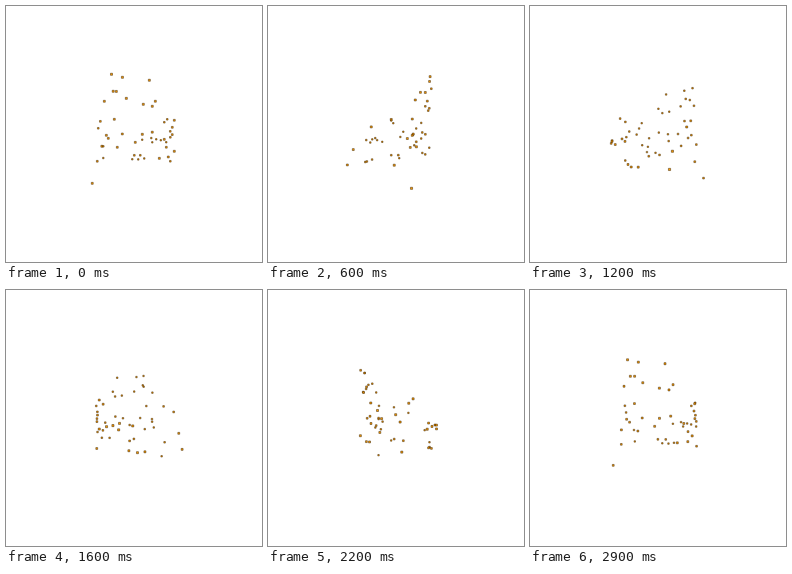
An HTML page with a canvas for the animation above (3000 ms loop, 256 by 256 pixels).

```html
<!DOCTYPE html>
<html>
<head>
<meta charset="utf-8">
<style>
  html, body { margin: 0; height: 100%; overflow: hidden; background: #fff; }
  canvas { display: block; }
</style>
</head>
<body>
<canvas id="stage" width="256" height="256"></canvas>
<script>
const ctx = document.getElementById('stage').getContext('2d');
const LOOP = 3000, STEPS = 30;
const CENTER = 128.3;
const EYE = 128 / Math.tan(Math.PI / 6); // 60 degree field of view

// Cloud of points: x, depth towards the viewer, y (down)
const cloud = [
  [-19, 37, -50], [-10, 35, -48], [12.8, 33, -46], [-18, 32.6, -36.7], [-15.7, 27.8, -37.5],
  [-6.8, 32.4, -30.7], [-26.5, 25.6, -29.2], [7.7, 31.8, -25.7], [18.6, 25.8, -29.2], [15.6, 29.4, -24.3],
  [-33, 6.2, -12.6], [-37.7, -10.2, -6.3], [-18.1, 20.9, -13.6], [31.9, -14, -12.8], [35.6, -17.8, -16.2],
  [36.8, 17.8, -12.9], [35.9, 12.2, -6.6], [36.5, -3.3, -3], [36.5, 8.6, 0.3], [37.2, -7.1, 3.1],
  [-25.1, 22.6, 0.9], [-23.9, 17.9, 3.7], [-10.9, 20, -0.3], [7, 28, 0], [9.3, -37.5, 6.3],
  [0.9, 20.2, 7.3], [16.1, 23.1, -1.9], [19.4, -31.2, 4.3], [21.1, -38.1, 9.4], [25.7, -37.7, 5.9],
  [30.5, -33.6, 6.9], [27.3, 19.7, 4.6], [36.2, -29.4, 9], [30.4, 11.2, 12.3], [-28.5, 27, 10.5],
  [-35, -28.9, 13.6], [-15.6, 18.4, 11.9], [35.1, 27.2, 14.9], [-35.4, 9.7, 25.8], [-35.8, -34.4, 27.4],
  [0, 2.1, 20.8], [-2.3, -33, 28.7], [4.6, -34.5, 29], [6.2, -7.5, 21.7], [11.4, -31.5, 27.6],
  [22.2, 25.1, 21.3], [30.9, 20.2, 20.6], [37.4, -8.5, 28], [-37.3, 25, 43.5]
];

function drawDot(x, y, scale) {
  const size = 1.7 * scale;
  ctx.beginPath();
  ctx.rect(x - size / 2, y - size / 2, size, size);
  ctx.fill();
  ctx.stroke();
}

function draw(now) {
  const angle = Math.floor(now % LOOP / LOOP * STEPS) / STEPS * 2 * Math.PI;
  const cos = Math.cos(angle), sin = Math.sin(angle);
  ctx.fillStyle = '#fff';
  ctx.fillRect(0, 0, 256, 256);
  ctx.fillStyle = '#ff9d00';
  ctx.strokeStyle = 'rgba(50, 30, 0, 0.6)';
  ctx.lineWidth = 0.8;
  for (const [x, z, y] of cloud) {
    const scale = EYE / (EYE - z * cos + x * sin);
    drawDot(CENTER + (x * cos + z * sin) * scale, CENTER + y * scale, scale);
  }
  requestAnimationFrame(draw);
}
requestAnimationFrame(draw);
</script>
</body>
</html>
```
